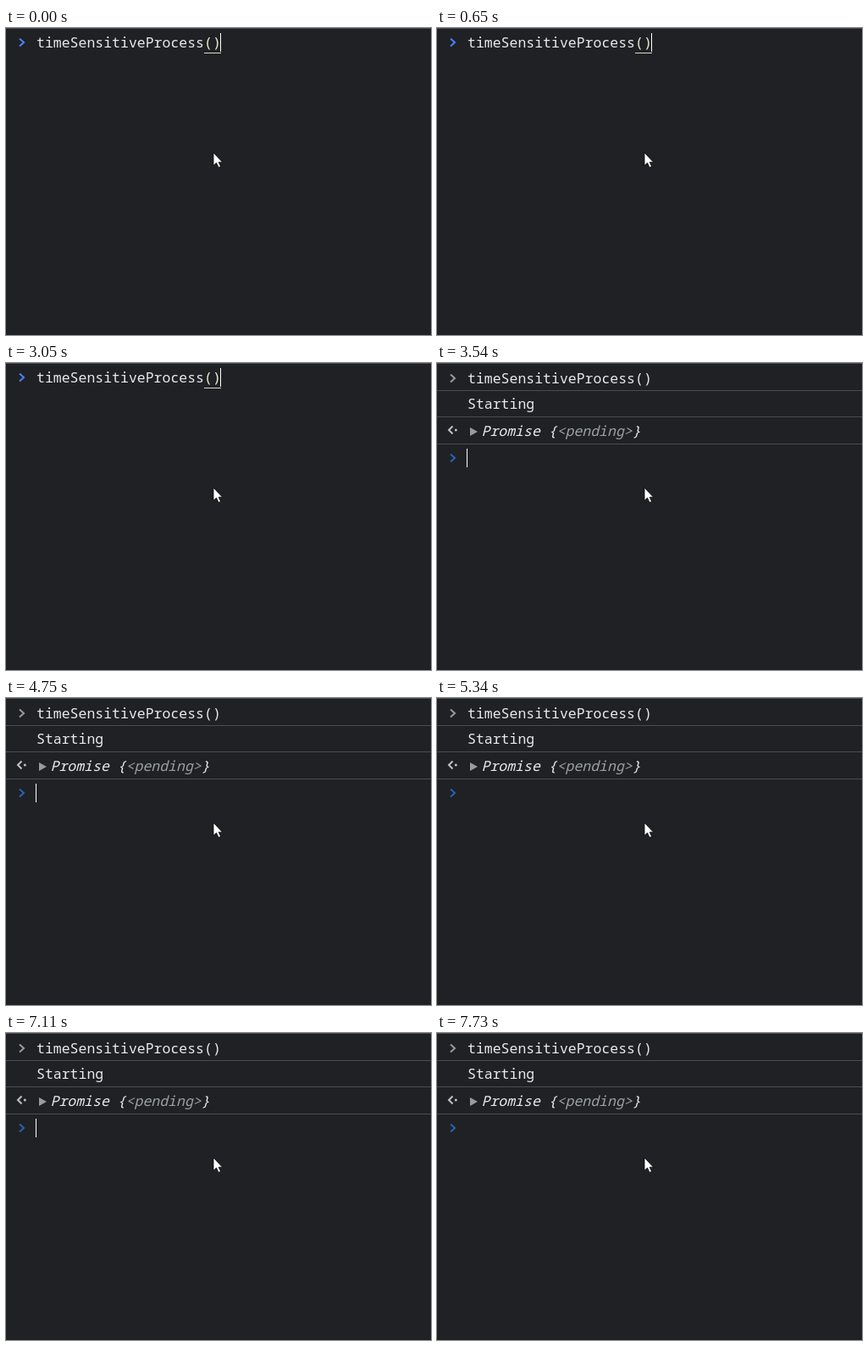
Recreate the animation shown at these times as an HTML page. Size 502 px wide and 362 px high, loop 8 s.

```html
<!DOCTYPE html>
<html>
<head>
<meta charset="utf-8">
<style>
html, body { margin: 0; width: 100%; height: 100%; overflow: hidden; background: #202124; }
svg { display: block; }
text { font: 16.5px "Noto Sans Mono", monospace; fill: #e8eaed; white-space: pre; }
.result { font-style: italic; }
.icon { fill: none; stroke-width: 2; }
.rule { fill: #494c50; }
</style>
</head>
<body>
<svg width="502" height="362" viewBox="0 0 502 362">
  <defs><path id="chevron" d="M-3 -4.5L2 0L-3 4.5"/></defs>
  <rect class="rule" width="502" height="1"/>

  <g id="typing">
    <use class="icon" href="#chevron" x="19" y="17" stroke="#4285f4"/>
    <text x="36" y="23">timeSensitiveProcess<tspan fill="#e6eed0">()</tspan></text>
    <rect x="234" y="29" width="20" height="1" fill="#d5dcc4"/>
  </g>

  <g id="output">
    <use class="icon" href="#chevron" x="19" y="18" stroke="#9a9a9a"/>
    <text x="36" y="24">timeSensitiveProcess()</text>
    <rect class="rule" y="32" width="502" height="1"/>
    <text x="36" y="54">Starting</text>
    <rect class="rule" y="63" width="502" height="1"/>
    <path class="icon" d="M18.5 74.5L14 79L18.5 83.5" stroke="#bdc1c6"/>
    <circle cx="22.3" cy="79" r="1.5" fill="#bdc1c6"/>
    <path d="M39 76L48 81L39 86Z" fill="#9a9a9a"/>
    <text class="result" x="52.5" y="86">Promise {<tspan fill="#9aa0a6">&lt;pending&gt;</tspan>}</text>
    <rect class="rule" y="95" width="502" height="1"/>
    <use class="icon" href="#chevron" x="19" y="112" stroke="#2862b4"/>
  </g>

  <rect id="caret" width="1" height="22" fill="#fff"/>
  <path d="M245 147V162.2L248.5 159L251 164.5L253.6 163.3L251.2 158.2H255.6Z" fill="#fff" stroke="#000" stroke-width=".8"/>
</svg>
<script>
const LOOP = 8000, RUN = 3540;
const blinks = [60, 650, 1270, 1860, 2480, 3050, 4130, 4750, 5340, 5960, 6520, 7110, 7730];
const [typing, output, caret] = ["typing", "output", "caret"].map(id => document.getElementById(id));
const show = (el, on) => el.setAttribute("visibility", on ? "visible" : "hidden");
const start = performance.now();

function draw(now) {
  const t = Math.max(0, now - start) % LOOP;
  const ran = t >= RUN;
  show(typing, !ran);
  show(output, ran);
  show(caret, blinks.filter(b => b <= t).length % 2 === 0);
  caret.setAttribute("x", ran ? 35 : 253);
  caret.setAttribute("y", ran ? 101 : 6);
  requestAnimationFrame(draw);
}
draw(start);
</script>
</body>
</html>
```
